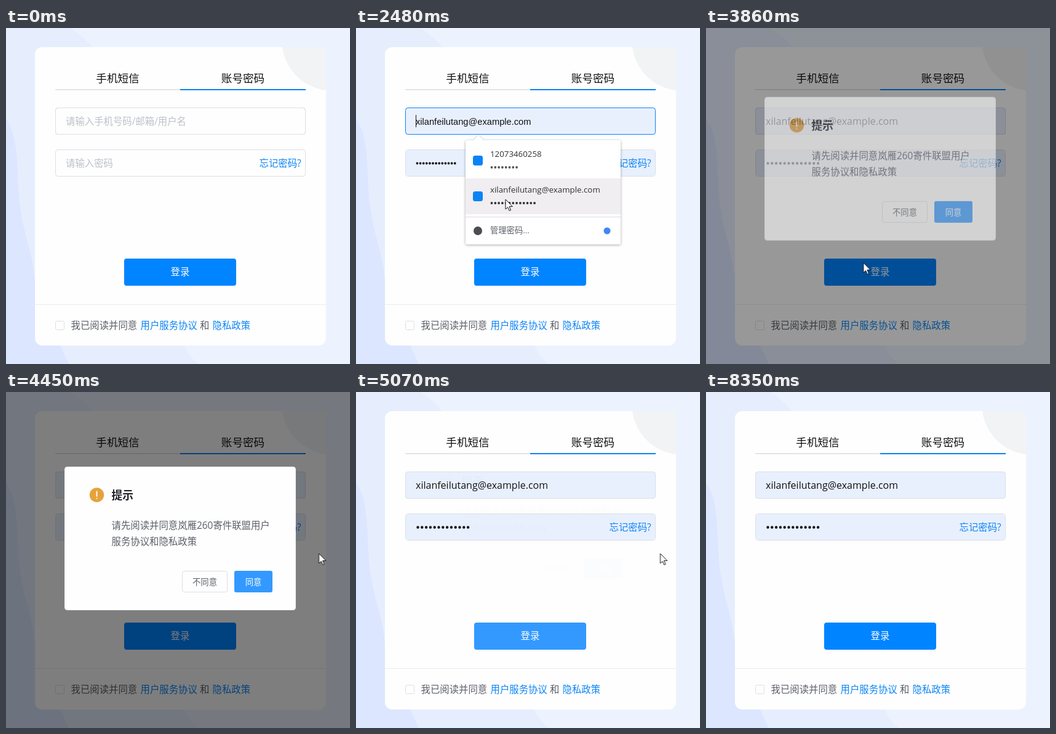
An HTML page for the animation above (8450 ms loop, 559x545 px).

```html
<!DOCTYPE html>
<html lang="zh-CN">
<head>
<meta charset="utf-8">
<title>登录</title>
<style>
html, body { margin: 0; width: 100%; height: 100%; overflow: hidden; background: #ecf3ff; }
svg { display: block; width: 100%; height: 100%; }
text { font: 15.4px "Open Sans", "Noto Sans CJK SC", "Noto Sans CJK", sans-serif; fill: #5b5f67; }
.mid { text-anchor: middle; }
.tab { font-size: 17.6px; fill: #111; }
.hint { fill: #bcc0c9; }
.link { fill: #0a84f5; }
.white { fill: #fff; }
.value { font-size: 16px; fill: #111; }
.preview { font: 14.65px "Liberation Sans", Arial, sans-serif; fill: #111; }
.small { font-size: 13.3px; }
.dark { fill: #303236; }
.title { font-size: 17.8px; font-weight: 700; fill: #202228; }
.dots { stroke: #111; stroke-width: 4.4; stroke-linecap: round; }
.dots.thin { stroke-width: 3.8; }
.box { fill: #fefefe; stroke: #dcdfe6; }

.on, .cursor, .field, .login, .mask, .modal, .caret, .blink { animation: 8.45s infinite; }
.on, .caret, .blink { animation-timing-function: step-end; }

/* Hard switches */
#hints { animation-name: hints; }
#fills { animation-name: fills; }
#phone, #row1 { animation-name: first; }
#mail, #row2 { animation-name: second; }
#real { animation-name: real; }
#menu { animation-name: menu; }
.blink { animation-name: blink; }
.caret { animation-name: caret; }
@keyframes hints { 0% { opacity: 1 } 22.2%, 100% { opacity: 0 } }
@keyframes fills { 0% { opacity: 0 } 22.2%, 100% { opacity: 1 } }
@keyframes first { 0%, 23.4%, 100% { opacity: 0 } 22.2% { opacity: 1 } }
@keyframes second { 0%, 31.6%, 100% { opacity: 0 } 23.4% { opacity: 1 } }
@keyframes real { 0% { opacity: 0 } 31.6%, 100% { opacity: 1 } }
@keyframes menu { 0%, 31.6%, 100% { opacity: 0 } 16.6% { opacity: 1 } }
@keyframes blink {
  0%, 21.89%, 33.73%, 44.02%, 100% { opacity: 0 }
  15.98%, 27.81%, 39.64% { opacity: 1 }
}
@keyframes caret { 0%, 100% { transform: none } 31.6% { transform: translate(215px, 0) } }

/* Colour and fade */
.field { animation-name: field; }
.login { animation-name: login; fill: #0084ff; }
.mask { animation-name: mask; opacity: 0; }
.modal { animation-name: modal; opacity: 0; }
@keyframes field {
  0%, 12%, 46.38%, 64.6%, 69.5%, 100% { stroke: #dcdfe6 }
  13.2%, 15.74%, 66.1%, 67.5% { stroke: #c0c4cc }
  18.1%, 44.02% { stroke: #0a84f5 }
}
@keyframes login {
  0%, 40.9%, 46%, 56.9%, 98.81%, 100% { fill: #0084ff }
  42.1%, 43.9%, 58.1%, 98.8% { fill: #39f }
  44.3%, 44.9% { fill: #0077e6 }
}
@keyframes mask {
  0%, 44.5%, 59.53%, 100% { opacity: 0 }
  46.86%, 57.16% { opacity: .5 }
}
@keyframes modal {
  0%, 44.5%, 60.71%, 100% { opacity: 0; transform: translate(0, -22px) }
  48.05%, 57.16% { opacity: 1; transform: none }
}

/* Pointer path */
.cursor { animation-name: move; animation-timing-function: ease-in-out; }
@keyframes move {
  0%, 5.5% { transform: translate(170px, 560px) }
  5.56% { transform: translate(170px, 538px) }
  13.49%, 20.59% { transform: translate(213px, 150px) }
  25.09%, 27.81% { transform: translate(247px, 285px) }
  29.35%, 36.69% { transform: translate(243px, 278px) }
  42.25%, 45.5% { transform: translate(255.5px, 381px) }
  52.66%, 56.69% { transform: translate(508.5px, 262px) }
  60% { transform: translate(494.5px, 262px) }
  66.15%, 67.1% { transform: translate(330px, 150px) }
  72.19%, 83.15% { transform: translate(130px, 560px) }
  83.2% { transform: translate(116.5px, 541px); animation-timing-function: ease-in }
  87.2% { transform: translate(338px, 220px); animation-timing-function: ease-out }
  89.3% { transform: translate(290px, 111px) }
  92.66%, 93.25% { transform: translate(130px, 473px) }
  95.86%, 100% { transform: translate(108px, 560px) }
}
</style>
</head>
<body>
<svg viewBox="0 0 559 545">
  <!-- Backdrop -->
  <path fill="#e6eefe" d="M0 0H105Q128 14 144 36L290 515Q298 534 313 545H0Z"/>
  <path fill="#dce6ff" d="M0 147C24 180 16 240 23 290S42 360 46 400S82 500 102 545H0Z"/>

  <!-- Card -->
  <path fill="#fefefe" d="M59 31H520V503a12 12 0 0 1-12 12H59a12 12 0 0 1-12-12V43a12 12 0 0 1 12-12Z"/>
  <path fill="#f2f3f5" d="M449 31A81 81 0 0 0 520 101V31Z"/>
  <text class="tab mid" x="181.5" y="88">手机短信</text>
  <text class="tab mid" x="385" y="88">账号密码</text>
  <path fill="#e4e4e6" d="M80 99H283V101H80Z"/>
  <path fill="#0a84f5" d="M283 99H487V101H283Z"/>

  <!-- Fields -->
  <rect class="box" x="80.5" y="129.5" width="406" height="43" rx="4"/>
  <rect class="box" x="80.5" y="197.5" width="406" height="43" rx="4"/>
  <g id="fills" class="on" fill="#e8f0fe">
    <rect x="81" y="130" width="405" height="42" rx="3.5"/>
    <rect x="81" y="198" width="405" height="42" rx="3.5"/>
  </g>
  <rect class="field" x="80.5" y="129.5" width="406" height="43" rx="4" fill="none" stroke="#dcdfe6"/>
  <g id="hints" class="on">
    <text class="hint" x="97" y="157">请输入手机号码/邮箱/用户名</text>
    <text class="hint" x="97" y="225">请输入密码</text>
  </g>
  <g id="phone" class="on">
    <text class="preview" x="97" y="157">12073460258</text>
    <path class="dots thin" stroke-dasharray="0 5.1" d="M99.5 219.5h36"/>
  </g>
  <g id="mail" class="on">
    <text class="preview" x="97" y="157">xilanfeilutang@example.com</text>
    <path class="dots thin" stroke-dasharray="0 5.1" d="M99.5 219.5h61.5"/>
  </g>
  <g id="real" class="on">
    <text class="value" x="97" y="157">xilanfeilutang@example.com</text>
    <path class="dots" stroke-dasharray="0 6.8" d="M100.5 219.5h82"/>
  </g>
  <g class="caret"><path class="blink" fill="#111" d="M97 141h1v20h-1Z"/></g>
  <text class="link" x="411.5" y="225">忘记密码?</text>

  <!-- Footer -->
  <rect class="login" x="192" y="374" width="182" height="44" rx="4"/>
  <text class="white mid" x="283" y="401">登录</text>
  <path fill="#ebecef" d="M47 448H520V449H47Z"/>
  <rect class="box" x="80.5" y="475.5" width="14" height="14" rx="2"/>
  <text x="105.5" y="488">我已阅读并同意</text>
  <text class="link" x="218.5" y="488">用户服务协议</text>
  <text x="315" y="488">和</text>
  <text class="link" x="335.5" y="488">隐私政策</text>

  <!-- Saved logins -->
  <g id="menu" class="on">
    <path fill="#fff" style="filter: drop-shadow(0 1px 2px #0005)"
      d="M181 182H191L199 174L207 182H427a3 3 0 0 1 3 3V348a3 3 0 0 1-3 3H181a3 3 0 0 1-3-3V185a3 3 0 0 1 3-3Z"/>
    <path id="row1" class="on" fill="#f0eef0" d="M178 186H430V244H178Z"/>
    <path id="row2" class="on" fill="#f0eef0" d="M178 244H430V302H178Z"/>
    <rect x="190" y="207" width="16" height="16" rx="3.5" fill="#0a84f5"/>
    <text class="small dark" x="218" y="209">12073460258</text>
    <path class="dots thin" style="stroke: #555" stroke-dasharray="0 5.8" d="M220.5 226h41"/>
    <rect x="190" y="265" width="16" height="16" rx="3.5" fill="#0a84f5"/>
    <text class="small dark" x="218" y="267">xilanfeilutang@example.com</text>
    <path class="dots thin" style="stroke: #333" stroke-dasharray="0 5.8" d="M220.5 284h70"/>
    <path fill="#dcdce6" d="M178 306H430V307H178Z"/>
    <circle cx="198" cy="329" r="7" fill="#4b4d52"/>
    <text class="small" x="218" y="333">管理密码...</text>
    <circle cx="408" cy="329" r="5.5" fill="#4285f4"/>
  </g>

  <!-- Consent dialog -->
  <rect class="mask" width="559" height="545"/>
  <g class="modal">
    <rect x="95.5" y="121.5" width="375" height="232" rx="4" fill="#fefefe" stroke="#ebeef5"/>
    <circle cx="147.5" cy="167" r="11.7" fill="#e6a23c"/>
    <path stroke="#fff" stroke-width="2" stroke-linecap="round" d="M147.5 161.5v7.5M147.5 172.7v.1"/>
    <text class="title" x="171.5" y="174">提示</text>
    <text x="171.5" y="222">请先阅读并同意岚雁260寄件联盟用户</text>
    <text x="171.5" y="248">服务协议和隐私政策</text>
    <rect class="box" x="286.5" y="290.5" width="73" height="34" rx="3"/>
    <text class="small mid" x="323" y="312.5">不同意</text>
    <rect x="371" y="290" width="62" height="35" rx="3" fill="#39f"/>
    <text class="small white mid" font-weight="500" x="402" y="312.5">同意</text>
  </g>

  <path class="cursor" fill="#fff" stroke="#111" d="M0 0V16L3.7 12.6 6.2 18.4 8.6 17.4 6.1 11.6H11.3Z"/>
</svg>
</body>
</html>
```
